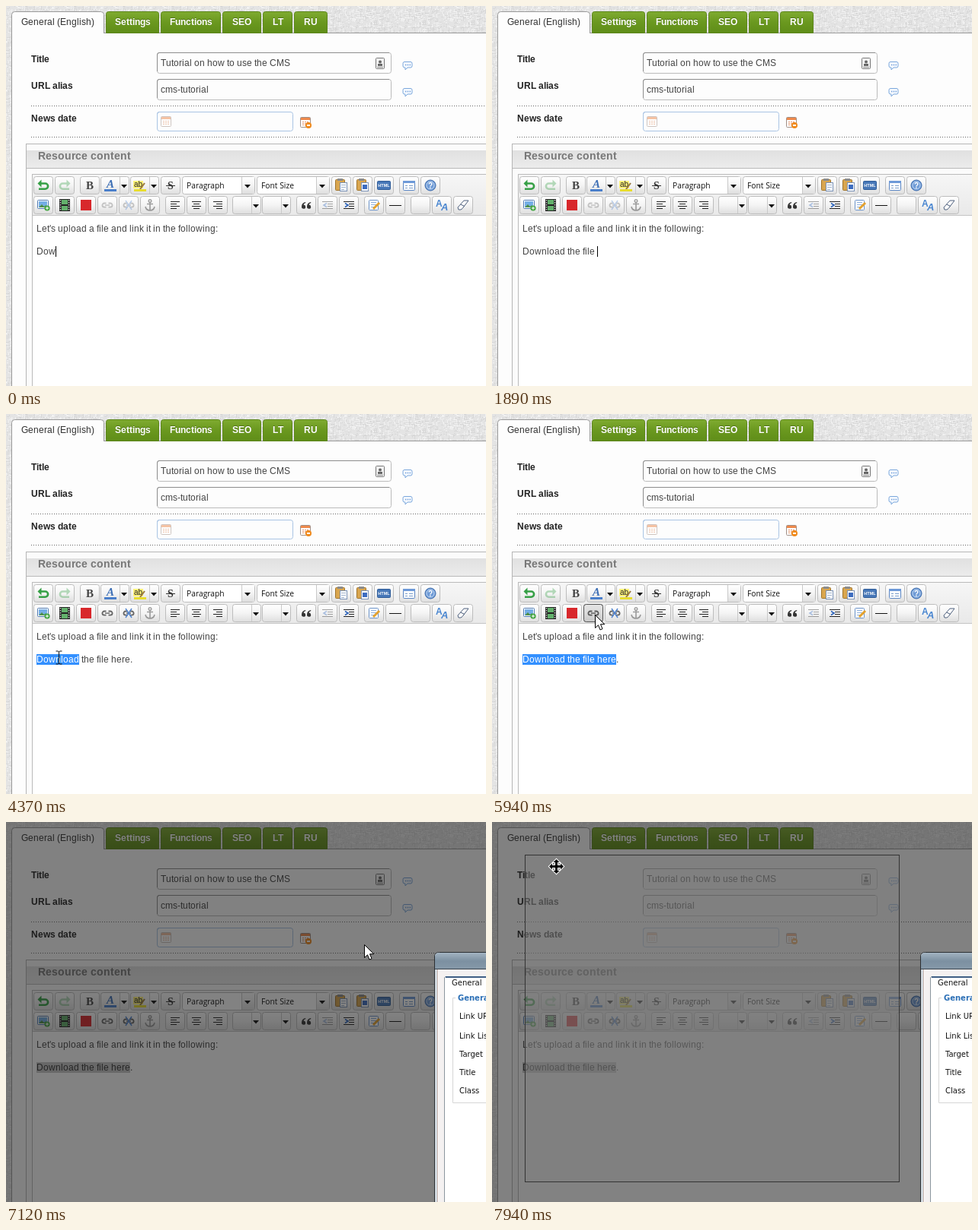
An HTML page for the animation above (8 s loop, 630x500 px).

```html
<!DOCTYPE html>
<html lang="en">
<head>
<meta charset="utf-8">
<title>CMS link tutorial</title>
<style>
html, body { margin: 0; width: 100%; height: 100%; overflow: hidden; background: #fff; }
svg { display: block; width: 100vw; height: 100vh; }
text { white-space: pre; }
</style>
</head>
<body>
<svg id="stage" viewBox="0 0 630 500" xmlns="http://www.w3.org/2000/svg"></svg>
<script>
const LOOP = 8000;
const SANS = "Arial, 'Liberation Sans', sans-serif";
const SERIF = "'Liberation Serif', serif";
const UI = "'Open Sans', 'Noto Sans', sans-serif";
const DIALOG = "'DejaVu Sans', sans-serif";
const SENTENCE = 'Download the file here.';
const TEXT_X = 40;

// ---------- drawing helpers ----------
const rect = (x, y, w, h, fill, more = '') =>
  `<rect x="${x}" y="${y}" width="${w}" height="${h}" fill="${fill}" ${more}/>`;
const box = (x, y, w, h, fill, stroke, r = 0) =>
  rect(x + .5, y + .5, w - 1, h - 1, fill, `stroke="${stroke}" rx="${r}"`);
const line = (d, stroke, width = 1, more = '') =>
  `<path d="${d}" fill="none" stroke="${stroke}" stroke-width="${width}" ${more}/>`;
const shape = (d, fill, more = '') => `<path d="${d}" fill="${fill}" ${more}/>`;
const group = (body, x = 0, y = 0, more = '') =>
  `<g transform="translate(${x} ${y})" ${more}>${body}</g>`;
const label = (s, x, y, size, family, fill, more = '') =>
  `<text x="${x}" y="${y}" font-size="${size}" font-family="${family}" fill="${fill}" ${more}>${s}</text>`;

// Hinted screen text: every glyph advances by a whole number of pixels.
const pen = document.createElement('canvas').getContext('2d');
function stops(s, x, size = 12, weight = 400) {
  pen.font = `${weight} ${size}px ${SANS}`;
  const xs = [x];
  for (const c of s) xs.push(xs.at(-1) + Math.round(pen.measureText(c).width));
  return xs;
}
const snapped = (s, x, y, fill, size = 12, weight = 400, id = '') =>
  `<text ${id && `id="${id}"`} x="${stops(s, x, size, weight).slice(0, -1).join(' ')}" y="${y}" ` +
  `font-family="${SANS}" font-size="${size}" font-weight="${weight}" fill="${fill}">${s}</text>`;

function gradient(id, ...colors) {
  const step = 1 / (colors.length - 1);
  return `<linearGradient id="${id}" x2="0" y2="1">` +
    colors.map((c, i) => `<stop offset="${i * step}" stop-color="${c}"/>`).join('') + '</linearGradient>';
}

function linen() {
  let seed = 7;
  const rnd = n => (seed = seed * 16807 % 2147483647) % n;
  let threads = rect(0, 0, 64, 64, '#e4e4e4');
  for (let i = 0; i < 620; i++) {
    const length = 1 + rnd(5), upright = rnd(2);
    threads += rect(rnd(64), rnd(64), upright ? 1 : length, upright ? length : 1, rnd(2) ? '#f1f1f1' : '#d8d8d8');
  }
  return `<pattern id="linen" width="64" height="64" patternUnits="userSpaceOnUse">${threads}</pattern>`;
}

// ---------- page ----------
function tab(name, x, right) {
  const w = stops(name, 0, 12, 700).at(-1);
  const tx = Math.round((x + right - w) / 2);
  return shape(`M${x + .5} 35.5V10.5q0-3 3-3H${right - 3.5}q3 0 3 3V35.5Z`, 'url(#green)', 'stroke="#5c861c"') +
    snapped(name, tx, 24, '#4b7010', 12, 700) + snapped(name, tx, 25, '#fff', 12, 700);
}

const field = (x, y, w, h, stroke) =>
  box(x, y, w, h, '#fdfdfd', stroke, 3) +
  line(`M${x + .5} ${y + h - 3}V${y + 3}q0-2.5 2.5-2.5H${x + w - 3}`, stroke === '#bbb' ? '#8c8c8c' : stroke);

const bubble = y => group(
  shape('M-4-4.5H4q2 0 2 2V1q0 2-2 2H0L-3 6V3H-4q-2 0-2-2V-2.5q0-2 2-2Z', '#f4f9ff', 'stroke="#7ba7dc"') +
  line('M-3-.5H4', '#6c9ad6', 1.4, 'stroke-dasharray="1.4 1.4"'), 527, y);

const calendar = (x, y, opacity) => group(
  box(0, 0, 14, 14, '#fff', '#a08f86', 1) + rect(1, 1, 12, 3, '#ee8a4d') +
  line('M3 6.5H11M3 8.5H11M3 10.5H11', '#e3946a', 1.2, 'stroke-dasharray="2 1"'), x, y, `opacity="${opacity}"`);

const form =
  snapped('Title', 33, 74, '#222', 12, 700) +
  snapped('URL alias', 33, 109, '#222', 12, 700) +
  snapped('News date', 33, 152, '#222', 12, 700) +
  field(198, 61, 308, 28, '#bbb') + field(198, 96, 308, 28, '#bbb') + field(198, 139, 179, 26, '#a9c4e4') +
  snapped('Tutorial on how to use the CMS', 203, 79, '#444') +
  snapped('cms-tutorial', 203, 114, '#444') +
  group(box(0, 0, 12, 15, '#f4f4f4', '#777', 1) + '<circle cx="6" cy="5.5" r="2" fill="#666"/>' +
    rect(3, 8, 6, 3, '#666') + rect(2, 12, 8, 1, '#888'), 485, 68) +
  bubble(78) + bubble(113) + calendar(203, 145, .5) + calendar(386, 146, 1) +
  '<circle cx="397" cy="157" r="4" fill="#f08a1c"/>' + rect(395, 156, 4, 2, '#fff') +
  line('M33 131.5H630M33 172.5H630', '#666', 1, 'stroke-dasharray="1 2"');

// ---------- toolbar icons, centred on 0,0 ----------
const bars = (...rows) => rows.map(([x, w], i) => rect(x, -5 + i * 3, w, 1, '#222')).join('');
const curl = line('M-4-2.5H2.5a3.6 3.6 0 0 1 0 7.2H-6', '#36a046', 2.6) + shape('M-2.5-7.5V2.5L-7.5-2.5Z', '#36a046');
const chain = line('M-1.5-2.5H-4a2.6 2.6 0 0 0 0 5.2H-1.5M1.5-2.5H4a2.6 2.6 0 0 1 0 5.2H1.5', '#666', 1.8) +
  rect(-3, -.7, 6, 1.6, '#777');
const clipboard = box(-8, -8, 13, 15, '#d9a64f', '#a0742c', 1) + rect(-5, -9, 7, 3, '#8c8c8c');
const sheet = box(-2, -4, 10, 12, '#fff', '#7c94b8');
const lines = (dir, color) => bars([-7, 14], [0, 7], [0, 7], [-7, 14]) + line(`M${-2 * dir - 3}-2.5L${2 * dir - 3} 0L${-2 * dir - 3} 2.5`, color, 1.6);

const icons = {
  undo: curl,
  redo: group(curl, 0, 0, 'style="transform:scaleX(-1)" opacity=".35"'),
  bold: label('B', 0, 5, 15, SERIF, '#444', 'font-weight="700" text-anchor="middle"'),
  color: label('A', 0, 3, 15, SERIF, '#3f70b5', 'font-weight="700" font-style="italic" text-anchor="middle"') + rect(-8, 5, 16, 3, '#4a7fcb'),
  marker: rect(-9, -6, 13, 10, '#fff27a') + label('ab', -8, 2, 10, SANS, '#222') + line('M0 5L6-3', '#9a7a3a', 2) + rect(-8, 5, 16, 3, '#e8dd2e'),
  strike: label('S', 0, 5, 14, SERIF, '#333', 'font-weight="700" text-anchor="middle"') + rect(-6, 0, 12, 1, '#333'),
  paste: clipboard + sheet + line('M0-.5H6M0 2.5H6M0 5.5H4', '#9fb2cc'),
  pasteDoc: clipboard + sheet + rect(0, -1, 6, 6, '#3c6cc0'),
  html: box(-9, -6, 18, 12, '#4878b8', '#2f5c98', 1) + label('HTML', 0, 2, 5.5, SANS, '#fff', 'font-weight="700" text-anchor="middle"'),
  template: box(-8, -6, 16, 13, '#fff', '#5b86c4', 1) + rect(-8, -6, 16, 3, '#6d99d8') + line('M-5 .5H-2M0 .5H5M-5 3.5H-2M0 3.5H5', '#7599c8'),
  help: '<circle r="7" fill="#6f9bd6" stroke="#3d6bab"/><circle r="5" fill="none" stroke="#c4daf4"/>' + label('?', 0, 4, 10, SANS, '#fff', 'font-weight="700" text-anchor="middle"'),
  image: box(-8, -7, 15, 12, '#fff', '#4f7bb4', 1) + rect(-6, -5, 11, 8, '#74aee6') + shape('M-6 3L-2-1L1 2L3 0L5 3Z', '#4f8f4a') + '<circle cx="5" cy="4" r="3.6" fill="#45a644"/>' + line('M3 4H7M5 2V6', '#fff'),
  film: rect(-7, -8, 14, 16, '#222') + rect(-4, -7, 8, 6, '#63b06c') + rect(-4, 1, 8, 6, '#63b06c') + line('M-5.5-7V8M5.5-7V8', '#ddd', 1.4, 'stroke-dasharray="1.5 1.5"'),
  video: rect(-7, -7, 14, 14, '#d8282c'),
  link: chain,
  unlink: chain + line('M-4-6L4 6M4-6L-4 6', '#4f83d0', 1.4),
  anchor: group(line('M0-4V7M-4-1.5H4M-6 2q1 5 6 5t6-5', '#555', 1.6) + '<circle cy="-5.5" r="1.8" fill="none" stroke="#555" stroke-width="1.4"/>', 0, 0, 'opacity=".55"'),
  left: bars([-6, 12], [-6, 8], [-6, 12], [-6, 8]),
  center: bars([-6, 12], [-4, 8], [-6, 12], [-4, 8]),
  right: bars([-6, 12], [-2, 8], [-6, 12], [-2, 8]),
  quote: [-6, 1].map(x => group(shape('M5-5Q0-4 0 1a2.6 2.6 0 1 0 2.4-2.4Q3-3.4 5.4-4Z', '#333'), x, 1)).join(''),
  outdent: group(lines(-1, '#3a6fc0'), 0, 0, 'opacity=".4"'),
  indent: lines(1, '#2c62b8'),
  edit: box(-7, -7, 13, 14, '#fff', '#6b93c9', 1) + line('M-4-3.5H3M-4-.5H3M-4 2.5H1', '#8fb0dc') + line('M-1 5L7-3', '#e3a12e', 3),
  rule: rect(-8, 0, 16, 1, '#111'),
  none: '',
  style: label('A', -8, 2, 12, SANS, '#4a86d0', 'font-weight="700"') + label('A', -1, 7, 13, SANS, '#4a86d0', 'font-weight="700" font-style="italic"'),
  eraser: shape('M-7 3L1-6H7L-1 4.500L-3 6H-6Z', '#fff', 'stroke="#4d5f7c" stroke-linejoin="round"') + line('M-3.500-1L2 1.500', '#4d5f7c')
};

const key = (x, cy, w) => box(x, cy - 12, w, 24, 'url(#key)', '#bdbdbd', 3);
const caretDown = (x, cy) => shape(`M${x - 4} ${cy - 2}H${x + 4}L${x} ${cy + 2.5}Z`, '#111');
const button = (name, x, cy, id) => key(x, cy, 26) + group(icons[name], x + 13, cy, id ? `id="${id}"` : '');
const split = (name, x, cy) => key(x, cy, 38) + line(`M${x + 25.5} ${cy - 11}V${cy + 11}`, '#c9c9c9') +
  group(icons[name], x + 13, cy) + caretDown(x + 31, cy + 1);
const select = (name, x) => box(x, 224, 96, 24, '#fff', '#bdbdbd', 3) + rect(x + 79, 225, 16, 22, 'url(#key)') +
  line(`M${x + 78.5} 225V247`, '#c9c9c9') + caretDown(x + 86, 237) + label(name, x + 6, 240, 10.3, UI, '#111');
const run = (names, x, cy) => names.split(' ').map((n, i) =>
  button(n, x + 28 * i, cy, /link/.test(n) ? n : '')).join('');

const toolbar =
  run('undo redo', 36, 236) + button('bold', 97, 236) + split('color', 124, 236) + split('marker', 163, 236) +
  button('strike', 203, 236) + select('Paragraph', 231) + select('Font Size', 329) +
  run('paste pasteDoc html', 427, 236) + run('template help', 516, 236) +
  run('image film video link unlink anchor', 36, 262) + run('left center right', 209, 262) +
  split('none', 297, 262) + split('none', 336, 262) + run('quote outdent indent', 381, 262) +
  run('edit rule', 470, 262) + run('none style eraser', 531, 262);

const page =
  rect(0, 0, 630, 500, 'url(#linen)') + rect(8, 35, 622, 465, '#fdfdfd') +
  line('M7.500 500V35M129 35.500H630', '#999') +
  [['Settings', 131, 201], ['Functions', 203, 282], ['SEO', 284, 335], ['LT', 337, 376], ['RU', 378, 422]].map(a => tab(...a)).join('') +
  shape('M7.500 36V11.500q0-4 4-4H124.500q4 0 4 4V36', '#fdfdfd', 'stroke="#999"') + rect(8, 35, 120, 2, '#fdfdfd') +
  snapped('General (English)', 20, 25, '#333') + form +
  box(26, 181, 640, 400, '#fbfbfb', '#b5b5b5') + rect(27, 190, 603, 23, 'url(#head)') + line('M27 213.500H630', '#b9b9b9') +
  snapped('Resource content', 42, 202, '#777', 14, 700) +
  box(34, 221, 640, 400, '#fff', '#bbb') + rect(35, 222, 595, 53, 'url(#bar)') + line('M35 275.500H630', '#c4c4c4') +
  toolbar + snapped("Let's upload a file and link it in the following:", TEXT_X, 297, '#444');

// ---------- dialog ----------
const dialogLabel = (s, y) => label(s, 595, y, 10, DIALOG, '#111');
const dialogForm =
  rect(568, 194, 62, 306, '#f4f1f1') + rect(575, 203, 55, 297, '#fff') +
  line('M575.500 500V205q0-1.500 2-1.500H630', '#8c979f') + rect(577, 203, 53, 2, '#3f5f85') +
  label('General', 585, 215, 10, DIALOG, '#111') +
  line('M590 231.500H586.500V369.500H630', '#d6d6d6') +
  label('General properties', 593, 235, 10, DIALOG, '#2b6fb6', 'font-weight="700"') +
  [['Link URL', 259], ['Link List', 285], ['Target', 309], ['Title', 333], ['Class', 357]].map(a => dialogLabel(...a)).join('');
const dialog =
  shape('M562.500 510V177q0-5.500 6-5.500H640V510Z', '#d3dae0', 'stroke="#2b2f33"') +
  shape('M563 194V177q0-5 6-5H630V194Z', 'url(#title)') + line('M563 193.500H630', '#39434c') +
  rect(566, 194, 64, 306, '#c9b5ae') + rect(567, 194, 63, 306, '#fff') + `<g id="dialogForm">${dialogForm}</g>`;

const cursors =
  `<g id="arrow">${shape('M0 0V17L4 13.300L6.500 19.500L9.500 18.200L7 12.200H12.300Z', '#fff', 'stroke="#000"')}</g>` +
  `<g id="beam">${line('M-4-8.500H-1L0-7.500L1-8.500H4M0-7.500V8M-4 8.500H-1L0 7.500L1 8.500H4', '#111')}</g>` +
  `<g id="move">${shape('M0-9.500L4-5.500H1.500V-1.500H5.500V-4L9.500 0L5.500 4V1.500H1.500V5.500H4L0 9.500L-4 5.500H-1.500V1.500H-5.500V4L-9.500 0L-5.500-4V-1.500H-1.500V-5.500H-4Z', '#000', 'stroke="#fff" stroke-width="2" paint-order="stroke"')}</g>`;

document.getElementById('stage').innerHTML =
  `<defs>${linen()}${gradient('green', '#7fab30', '#6a981f', '#5f8d18')}${gradient('key', '#ffffff', '#f4f4f4', '#dedede')}` +
  `${gradient('head', '#e0e0e0', '#ececec')}${gradient('bar', '#f6f6f6', '#e9e9e9')}${gradient('title', '#a3b4c2', '#7c90a1', '#8699a9')}</defs>` +
  page + rect(0, 250, 26, 24, '#000', 'id="hover" fill-opacity=".1" stroke="#555" rx="3"') +
  snapped(SENTENCE, TEXT_X, 327, '#444', 12, 400, 'typed') + rect(TEXT_X, 316, 0, 14, '#3390ff', 'id="selection"') +
  snapped(SENTENCE, TEXT_X, 327, '#fff', 12, 400, 'marked') + rect(0, 316, 1, 14, '#000', 'id="caret"') +
  `<g id="modal">${rect(0, 0, 630, 500, '#181818', 'fill-opacity=".54"')}${dialog}</g>` +
  rect(0, 0, 491, 430, '#808080', 'id="ghost" fill-opacity=".5" stroke="#333"') + cursors;

// ---------- motion ----------
const $ = id => document.getElementById(id);
const show = (id, on) => $(id).setAttribute('visibility', on ? 'visible' : 'hidden');
const set = (id, attrs) => { for (const k in attrs) $(id).setAttribute(k, attrs[k]); };
const edges = stops(SENTENCE, TEXT_X);
const linear = p => p;
const easeOut = power => p => 1 - (1 - p) ** power;

// [start, count]: number of characters on screen from that time on
const typing = [[0, 3], [340, 5], [590, 6], [705, 7], [820, 8], [940, 9], [1050, 10], [1165, 12], [1280, 13],
  [1520, 15], [1640, 17], [1890, 18], [2000, 19], [2120, 20], [2240, 21], [2350, 23]];

// Pointer moves in equal steps; the first step lands at start, the last at end.
const moves = [
  { start: 3310, end: 3780, steps: 5, from: [29, 495], to: [69, 343] },
  { start: 4000, end: 4120, steps: 2, from: [69, 343], to: [69, 320] },
  { start: 4610, end: 4970, steps: 4, from: [69, 320], to: [150, 330] },
  { start: 5340, end: 5940, steps: 6, from: [151, 330], to: [135, 264], ease: [p => p ** 5, easeOut(2)] },
  { start: 6650, end: 7340, steps: 7, from: [135, 264], to: [604, 186], arc: 60 },
  { start: 7460, end: 7940, steps: 5, from: [604, 186], to: [84, 58], ease: [easeOut(2.94), easeOut(2.28)] }
];
const drag = { start: 7460, end: 7940, steps: 5, from: [563, 171], to: [43, 43], ease: [easeOut(1.94), easeOut(1.62)] };

function place({ start, end, steps, from, to, ease = [linear, linear], arc = 0 }, t) {
  const k = Math.floor((t - start + 2) / ((end - start) / (steps - 1))) + 1;
  const p = Math.min(1, k / steps);
  const [x, y] = from.map((a, i) => Math.round(a + (to[i] - a) * ease[i](p)));
  return [x, Math.round(y - arc * Math.sin(Math.PI * p))];
}

function selectedCount(t, x) {
  if (t < 4370) return 0;
  if (t >= 4970) return SENTENCE.length - 1;
  const under = edges.findLastIndex(e => e <= x);
  const stop = SENTENCE.slice(under).search(/[ .]/);
  return Math.max(8, under + stop);
}

function draw(t) {
  const count = typing.findLast(([start]) => t >= start)[1];
  const modal = t >= 6400, dragging = t >= drag.start;
  const move = moves.findLast(m => t >= m.start);
  const [x, y] = move ? place(move, t) : [0, 0];
  const [gx, gy] = dragging ? place(drag, t) : [563, 171];
  const marked = selectedCount(t, x);

  $('typed').textContent = SENTENCE.slice(0, count);
  $('marked').textContent = SENTENCE.slice(0, marked);
  set('marked', { fill: modal ? '#333' : '#fff' });
  set('selection', { width: edges[marked] - TEXT_X, fill: modal ? '#c8c8c8' : '#3390ff' });
  set('caret', { x: edges[count] });
  show('caret', t < 2840 || (t >= 3310 && t < 3780));

  const enabled = t >= 3780 ? 1 : .35;
  set('link', { opacity: enabled });
  set('unlink', { opacity: enabled });

  const overBar = y >= 250 && y < 276;
  const hovered = move && !modal && overBar && [120, 148].find(b => x >= b && x < b + 26);
  show('hover', hovered);
  if (hovered) set('hover', { x: hovered + .5, y: 250.5, width: 25, height: 23 });

  show('modal', modal);
  set('dialogForm', { display: t >= 6650 ? 'inline' : 'none' });
  show('ghost', dragging);
  set('ghost', { x: gx + .5, y: gy + .5 });

  const overTitle = modal && x >= gx && y >= gy && y < gy + 23;
  const pointer = overTitle ? 'move' : modal || overBar ? 'arrow' : 'beam';
  for (const id of ['arrow', 'beam', 'move']) show(id, move && id === pointer);
  set(pointer, { transform: `translate(${x + .5} ${y + .5})` });
}

const began = performance.now();
function tick() {
  draw((performance.now() - began) % LOOP);
  requestAnimationFrame(tick);
}
tick();
</script>
</body>
</html>
```
